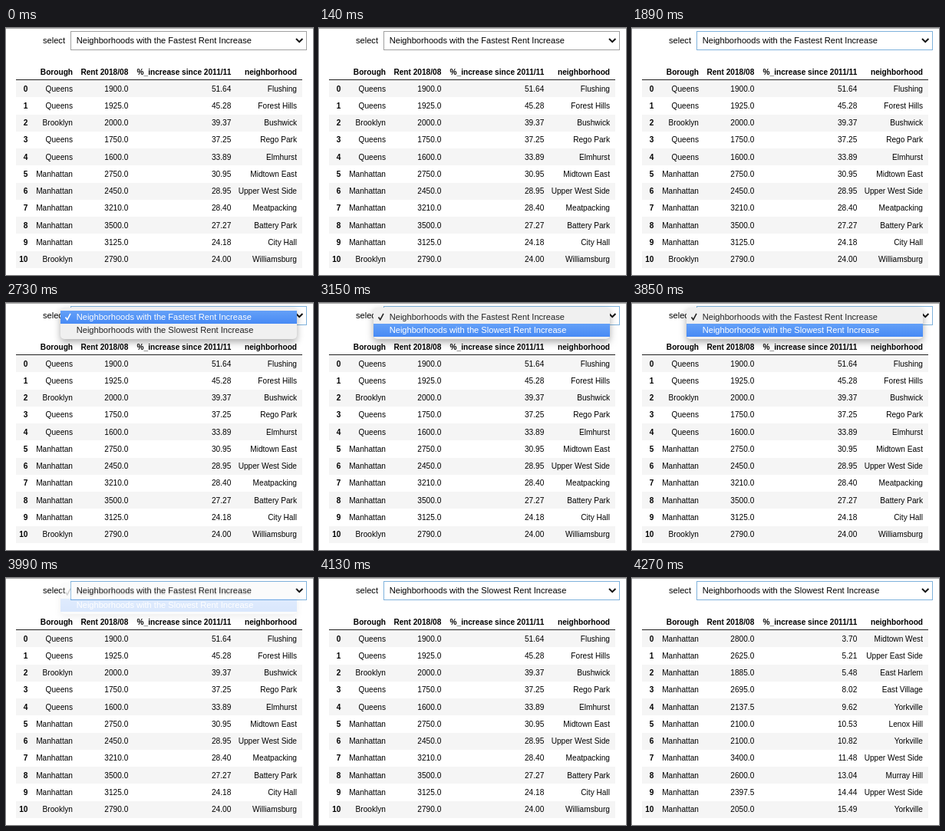
These frames come from a looping animation (400x322 px, 8540 ms). An HTML page with a canvas:

```html
<!DOCTYPE html>
<html lang="en">
<head>
<meta charset="utf-8">
<title>Rent increase by neighborhood</title>
<style>
html, body { margin: 0; width: 100%; height: 100%; overflow: hidden; background: #fff; }
canvas { display: block; width: 400px; height: 322px; }
</style>
</head>
<body>
<canvas id="stage"></canvas>
<script>
const W = 400, H = 322, LOOP = 8540;
const FONT = '"Liberation Sans", Arial, sans-serif';
const ratio = window.devicePixelRatio || 1;

function prepare(canvas) {
  canvas.width = W * ratio;
  canvas.height = H * ratio;
  const context = canvas.getContext('2d');
  context.scale(ratio, ratio);
  return context;
}

const page = prepare(document.getElementById('stage'));
const menu = prepare(document.createElement('canvas'));
let ctx = page;

const OPTIONS = ['Fastest', 'Slowest'].map(s => `Neighborhoods with the ${s} Rent Increase`);
const HEADS = ['Borough', 'Rent 2018/08', '%_increase since 2011/11', 'neighborhood'];
const RIGHT = [87, 159.3, 293.3, 379];

const parse = text => text.trim().split('\n').map(line => line.split(','));
const FAST = parse(`
Queens,1900.0,51.64,Flushing
Queens,1925.0,45.28,Forest Hills
Brooklyn,2000.0,39.37,Bushwick
Queens,1750.0,37.25,Rego Park
Queens,1600.0,33.89,Elmhurst
Manhattan,2750.0,30.95,Midtown East
Manhattan,2450.0,28.95,Upper West Side
Manhattan,3210.0,28.40,Meatpacking
Manhattan,3500.0,27.27,Battery Park
Manhattan,3125.0,24.18,City Hall
Brooklyn,2790.0,24.00,Williamsburg`);
const SLOW = parse(`
Manhattan,2800.0,3.70,Midtown West
Manhattan,2625.0,5.21,Upper East Side
Manhattan,1885.0,5.48,East Harlem
Manhattan,2695.0,8.02,East Village
Manhattan,2137.5,9.62,Yorkville
Manhattan,2100.0,10.53,Lenox Hill
Manhattan,2100.0,10.82,Yorkville
Manhattan,3400.0,11.48,Upper West Side
Manhattan,2600.0,13.04,Murray Hill
Manhattan,2397.5,14.44,Upper West Side
Manhattan,2050.0,15.49,Yorkville`);

function label(text, x, y, size, align = 'left', color = '#000', weight = 'normal') {
  ctx.font = `${weight} ${size}px ${FONT}`;
  ctx.textAlign = align;
  ctx.fillStyle = color;
  ctx.fillText(text, x, y);
}

function stroke(points, color, width) {
  ctx.beginPath();
  points.forEach(([x, y]) => ctx.lineTo(x, y));
  ctx.strokeStyle = color;
  ctx.lineWidth = width;
  ctx.stroke();
}

function drawTable(rows) {
  const top = 68, pitch = 22.25;
  HEADS.forEach((h, i) => label(h, RIGHT[i], 60.5, 10.15, 'right', '#000', 'bold'));
  rows.forEach((row, r) => {
    const y = top + r * pitch;
    if (r % 2 === 0) {
      ctx.fillStyle = '#f5f5f5';
      ctx.fillRect(13, Math.round(y), 373, 22);
    }
    const base = y + 14.7;
    label(r, 28.5, base, 10.15, 'right', '#000', 'bold');
    row.forEach((cell, i) => label(cell, RIGHT[i], base, 10.15, 'right'));
  });
  stroke([[13, 67.5], [386, 67.5]], '#222', 1);
}

function drawSelect(option, focused) {
  label('select', 77, 20, 11.1, 'right');
  ctx.strokeStyle = focused ? '#7fb2dc' : '#a0a0a0';
  ctx.lineWidth = 1;
  ctx.strokeRect(84.5, 4.5, 307, 24);
  label(OPTIONS[option], 91.7, 20.3, 11.1);
  stroke([[378, 14], [382.2, 18.2], [386.4, 14]], '#111', 2);
}

function drawMenu(active) {
  const left = 71, width = 308;
  ctx.clearRect(0, 0, W, H);
  ctx.shadowColor = 'rgba(0,0,0,.32)';
  ctx.shadowBlur = 10 * ratio;
  ctx.shadowOffsetY = 4 * ratio;
  ctx.fillStyle = '#f0f0f0';
  ctx.beginPath();
  ctx.roundRect(left, 6, width, 41, 5);
  ctx.fill();
  ctx.shadowColor = 'transparent';

  if (active >= 0) {
    const y = 10 + active * 17;
    const blue = ctx.createLinearGradient(0, y, 0, y + 17);
    blue.addColorStop(0, '#64a0f7');
    blue.addColorStop(1, '#478af5');
    ctx.fillStyle = blue;
    ctx.fillRect(left, y, width, 17);
  }
  const ink = i => i === active ? '#fff' : '#222';
  OPTIONS.forEach((text, i) => label(text, 91.7, 22 + i * 17, 11.1, 'left', ink(i)));
  stroke([[77.5, 18.5], [79.8, 21.8], [84, 13.8]], ink(0), 1.6);
}

function menuAlpha(t) {
  if (t < 2730 || t >= 4130) return 0;
  if (t < 3920) return 1;
  return t < 3990 ? 0.6 : t < 4060 ? 0.2 : 0.05;
}

function activeItem(t) {
  if (t < 3010) return 0;
  return t >= 3640 && t < 3710 ? -1 : 1; // blink on click
}

function draw(t) {
  ctx = page;
  ctx.fillStyle = '#fff';
  ctx.fillRect(0, 0, W, H);
  stroke([[0, 0.5], [W, 0.5]], '#a8a8a8', 1);
  drawTable(t < 4270 ? FAST : SLOW);
  drawSelect(t < 4060 ? 0 : 1, t >= 1890);

  const alpha = menuAlpha(t);
  if (!alpha) return;
  ctx = menu;
  drawMenu(activeItem(t));
  // fade the menu as one layer
  page.globalAlpha = alpha;
  page.drawImage(menu.canvas, 0, 0, W, H);
  page.globalAlpha = 1;
}

const start = performance.now();
function tick() {
  draw((performance.now() - start) % LOOP);
  requestAnimationFrame(tick);
}
tick();
</script>
</body>
</html>
```
